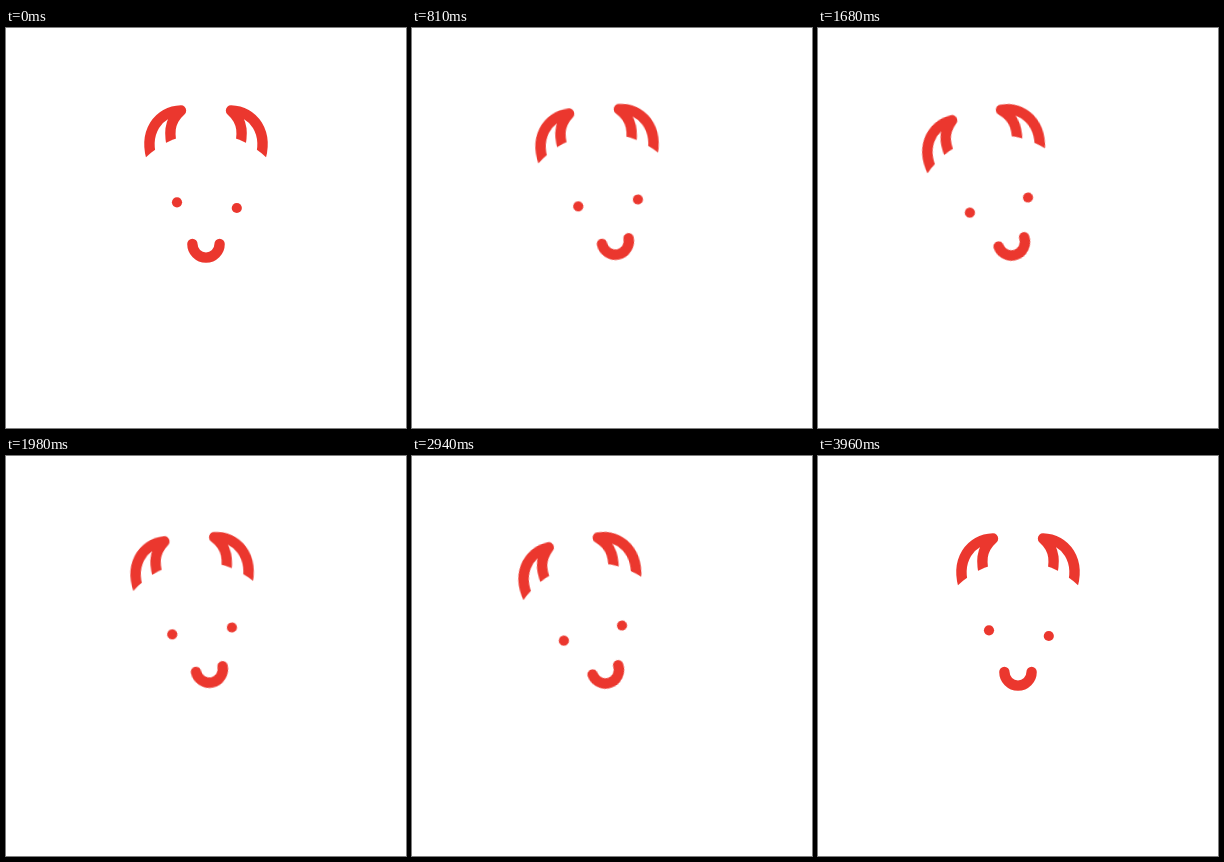
Animation, 400 px wide and 400 px high, one loop 6.44 s. Source, as an HTML page without scripts:

```html
<!DOCTYPE html>
<html lang="en">
<head>
<meta charset="utf-8">
<title>Little devil</title>
<style>
  html, body { margin: 0; width: 100%; height: 100%; overflow: hidden; background: #fff; }
  svg { display: block; width: 100%; height: 100%; }

  .line { fill: none; stroke: #eb372e; stroke-width: 10.4; stroke-linecap: round; stroke-linejoin: round; }
  .eye { fill: #eb372e; }
  .skin { fill: #fff; }

  .head, .face, .lid { animation: 6440ms ease-in-out infinite; }
  .head { transform-origin: 201px 282px; animation-name: sway; }
  .face { transform-origin: 200px 216px; animation-name: tilt; }
  .lid { animation-name: wink; }

  /* settle, wind up, swing left; the last swing overshoots to rest */
  @keyframes sway {
    0%, 59.63%, 100% { transform: rotate(0deg); }
    5.59%, 23.29%, 40.99% { transform: rotate(-11.7deg); }
    8.39%, 26.09%, 43.79% { transform: rotate(-12deg); }
    13.51%, 19.1%, 31.21%, 36.8% { transform: rotate(-4.7deg); }
    20.03%, 37.73% { transform: rotate(-2.3deg); }
    54.97% { transform: rotate(2deg); }
  }

  @keyframes tilt {
    0%, 52.8%, 100% { transform: translate(0px, 0px) rotate(0deg); }
    5.12%, 8.85%, 22.67%, 26.55%, 40.37%, 46.12% { transform: translate(-6.6px, -2.1px) rotate(-20deg); }
    12.42%, 19.1%, 30.12%, 36.8% { transform: translate(3.3px, -2.9px) rotate(-12deg); }
  }

  @keyframes wink {
    0%, 6.99%, 10.25%, 100% { transform: translateY(0px); }
    8.39%, 8.85% { transform: translateY(11px); }
  }
</style>
</head>
<body>
<svg viewBox="0 0 400 400">
  <defs>
    <path id="horn" class="line" d="M147 135C136 104 153 83 175 82.5C162 94 163 106 167 125"/>
  </defs>
  <g class="head">
    <use href="#horn"/>
    <use href="#horn" transform="matrix(-1 0 0 1 400 0)"/>
    <circle class="skin" cx="200" cy="192.5" r="87.3"/>
  </g>
  <g class="face">
    <circle class="eye" cx="171" cy="174.3" r="5.1"/>
    <circle class="eye" cx="230.8" cy="180" r="5.1"/>
    <rect class="skin lid" x="222" y="162" width="18" height="12.5"/>
    <path class="line" d="M186.4 216a13.6 13.6 0 0 0 27.2 0"/>
  </g>
</svg>
</body>
</html>
```
